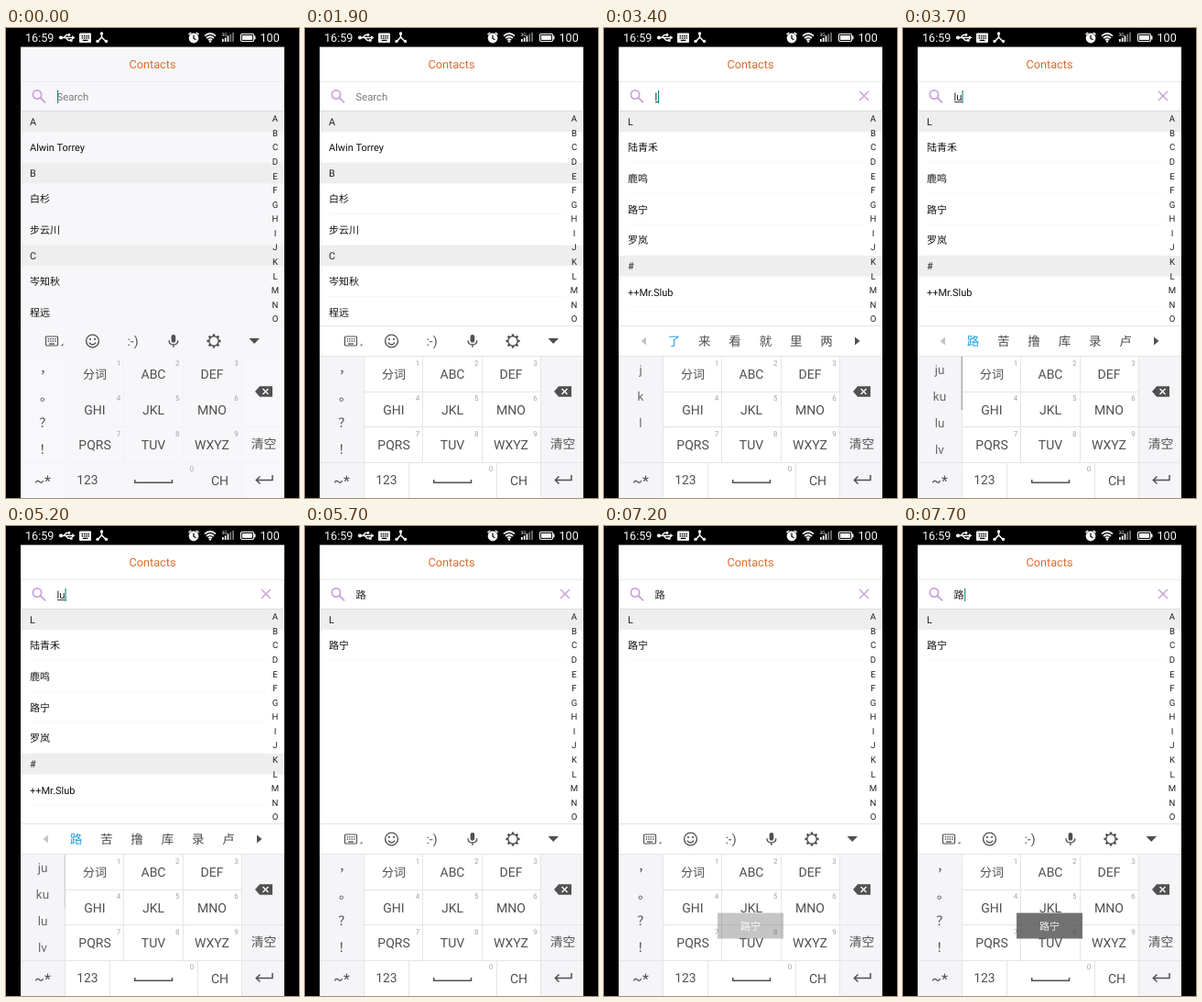
These frames come from a looping animation (320 by 512 pixels, 8000 ms). An HTML page:

```html
<!DOCTYPE html>
<html lang="zh-CN">
<head>
<meta charset="utf-8">
<title>Contacts</title>
<style>
html, body { margin: 0; width: 100%; height: 100%; overflow: hidden; background: #000; }
svg { display: block; width: 320px; height: 512px; --page: #fff; --line: #e5e5e8; --side: #f5f5f8;
  font-family: Roboto, "Noto Sans CJK SC", "Noto Sans CJK", sans-serif; }
svg.pale { --page: #f7f7fa; --line: #f3f3f6; --side: #f8f8fb; }
.page { fill: var(--page); }
.side { fill: var(--side); }
.key { stroke: var(--line); fill: none; }
text { white-space: pre; text-rendering: geometricPrecision; }
</style>
</head>
<body>
<svg id="stage" width="320" height="512" viewBox="0 0 320 512"></svg>
<script>
const stage = document.getElementById('stage');
const INK = '#202020', KEY = '#505052', LILAC = '#cba4dc', WHITE = '#f8f8f8';
const LOOP = 8000, TOP = 90.5, HEAD = 22.5, ROW = 33.75;

function add(tag, attrs, parent = stage) {
  const el = document.createElementNS('http://www.w3.org/2000/svg', tag);
  for (const k in attrs) el.setAttribute(k, attrs[k]);
  return parent.appendChild(el);
}
const group = () => add('g', {});
const box = (x, y, w, h, fill, parent) => add('rect', { x, y, width: w, height: h, fill }, parent);
const area = (x, y, w, h, cls, parent) => add('rect', { x, y, width: w, height: h, class: cls }, parent);
const line = (d, stroke, width, parent) =>
  add('path', { d, stroke, 'stroke-width': width, fill: 'none' }, parent);
const solid = (d, fill, parent) => add('path', { d, fill }, parent);
const dot = (cx, cy, r, fill, parent) => add('circle', { cx, cy, r, fill }, parent);
const ring = (cx, cy, r, stroke, width, parent) =>
  add('circle', { cx, cy, r, stroke, 'stroke-width': width, fill: 'none' }, parent);

// Text placed by the middle of its capitals
function label(x, cy, str, size, fill, parent, anchor = 'middle') {
  const el = add('text', { x, y: cy + size * 0.36, 'font-size': size, fill, 'text-anchor': anchor }, parent);
  el.textContent = str;
  return el;
}

function keyDots(x, y, w, h, fill, gap, parent) {
  for (let r = 0; r < 2; r++)
    for (let c = 0; c < 4; c++)
      box(x + w * (0.17 + c * 0.19), y + 2 + r * gap, 1.4, 1.4, fill, parent);
  box(x + w * 0.27, y + h - 2.6, w * 0.46, 1.3, fill, parent);
}

function statusBar() {
  label(21, 10.5, '16:59', 12.6, WHITE, stage, 'start');
  line('M60 10.5H73M63 10.5L66 7.5H69M65 10.5L68 13.5H71', WHITE, 1.3);
  dot(60, 10.5, 2.1, WHITE);
  dot(69, 7.5, 1.4, WHITE);
  box(70, 12.2, 2.6, 2.6, WHITE);
  solid('M72 8.2L75.5 10.5L72 12.8Z', WHITE);
  add('rect', { x: 80, y: 5.5, width: 13, height: 10.4, rx: 1, fill: WHITE });
  keyDots(80.6, 6, 12, 9.4, '#000', 2.3);
  line('M104.5 6V10L100 15M104.5 10L109.5 15', WHITE, 1.6);
  for (const [cx, cy] of [[104.5, 6], [100, 14.5], [109.5, 14.5]]) dot(cx, cy, 1.7, WHITE);
  dot(205, 11, 5.4, WHITE);
  line('M205 7.8V11.4L207.4 12.8', '#000', 1.2);
  line('M199.5 7.2L202.3 5M210.5 7.2L207.7 5', WHITE, 1.5);
  line('M217 8.6Q223 3.4 229 8.6M219 11Q223 7.4 227 11M221 13.2Q223 11.4 225 13.2', WHITE, 1.8);
  dot(223, 14.6, 1.2, WHITE);
  label(238.5, 6.8, '3G', 5, WHITE);
  [3, 4.5, 6.5, 8.5, 10].forEach((h, i) => box(236 + i * 2.8, 15 - h, 1.7, h, i < 3 ? WHITE : '#777'));
  add('rect', { x: 256.5, y: 6.5, width: 14, height: 8, rx: 1.2, fill: 'none', stroke: WHITE, 'stroke-width': 1.2 });
  box(258, 8, 11, 5, WHITE);
  box(271, 8.6, 1.5, 3.8, WHITE);
  label(277.5, 10.5, '100', 12.6, WHITE, stage, 'start');
}

function contactList(sections) {
  const g = group();
  let y = TOP;
  for (const [letter, ...names] of sections) {
    box(16, y, 288, HEAD, '#eeeeef', g);
    label(26, y + HEAD / 2 + 0.3, letter, 10.8, INK, g, 'start');
    y += HEAD;
    for (const name of names) {
      label(26, y + ROW / 2 + 0.2, name, 11, '#111', g, 'start');
      y += ROW;
      if (y < 324) box(26, y - 0.7, 258, 0.7, '#f4f4f5', g);
    }
  }
  return g;
}

function sideColumn(items) {
  const g = group();
  items.forEach((s, i) => label(40, 372 + i * 29.2, s, 13.5, '#6a6a6c', g));
  return g;
}

function candidates(words) {
  const g = group();
  solid('M46 336.5V345.5L40.5 341Z', '#c4c4c6', g);
  solid('M274 336.5V345.5L279.5 341Z', KEY, g);
  [...words].forEach((w, i) => label(76.5 + i * 33.3, 340.8, w, 13.5, i ? '#4c4c4e' : '#259fe3', g));
  return g;
}

function toolbar() {
  const g = group();
  add('rect', { x: 43.5, y: 336, width: 13, height: 10, rx: 1, fill: 'none', stroke: KEY, 'stroke-width': 1.2 }, g);
  keyDots(43.5, 336, 13, 10, KEY, 2.5, g);
  solid('M62.5 343.5V346.3H59.7Z', '#777', g);
  ring(94.5, 341, 6.9, KEY, 1.4, g);
  dot(92, 339, 1.1, KEY, g);
  dot(97, 339, 1.1, KEY, g);
  line('M90.8 342.6Q94.5 347.4 98.2 342.6', KEY, 1.3, g);
  label(138.5, 340.6, ':-)', 14, KEY, g);
  add('rect', { x: 180.6, y: 334, width: 4.6, height: 8.8, rx: 2.3, fill: KEY }, g);
  line('M178 340.2Q178 345 182.9 345T187.8 340.2M182.9 345V348', KEY, 1.3, g);
  ring(227, 341, 5.2, KEY, 1.4, g);
  for (let i = 0; i < 8; i++)
    add('path', { d: 'M227 333.4V336', stroke: KEY, 'stroke-width': 2.4, transform: `rotate(${i * 45} 227 341)` }, g);
  solid('M265.5 338H277L271.2 344Z', KEY, g);
  return g;
}

function keypad() {
  area(16, 324.3, 288, 187.7, 'page');
  area(16, 357, 48.5, 155, 'side');
  area(257, 357, 47, 155, 'side');
  add('path', { class: 'key', d: 'M16 324.5H304M16 357.5H304M64.5 396.5H257.5M64.5 434.5H304M16 473.5H304' +
    'M64.5 357V512M128.5 357V473M193.5 357V473M257.5 357V512M113.5 473V512M209.5 473V512' });
  ['分词', 'ABC', 'DEF', 'GHI', 'JKL', 'MNO', 'PQRS', 'TUV', 'WXYZ'].forEach((s, i) => {
    const c = i % 3, r = (i - c) / 3;
    label(97 + c * 64, 377 + r * 38.5, s, i ? 14 : 13, KEY);
    label(123 + c * 64.2, 365 + r * 38.5, i + 1, 8, '#a2a2a4');
  });
  label(203, 480.3, '0', 8, '#a2a2a4');
  label(89, 492.5, '123', 13.8, KEY);
  label(233.5, 492.5, 'CH', 14, KEY);
  label(40, 493, '~*', 16, KEY);
  label(281.5, 453.5, '清空', 13.8, KEY);
  line('M140.7 492V495.3H181.5V492', KEY, 1.5);
  solid('M272 396L277 390.3H291V401.7H277Z', KEY);
  line('M280.5 393L286.5 399M286.5 393L280.5 399', '#fff', 1.4);
  line('M291 487V492.5H274M277.5 488.5L273.3 492.5L277.5 496.5', KEY, 1.5);
}

function searchText(str, underline) {
  const g = group();
  label(55.5, 75, str, 11.2, INK, g, 'start');
  if (underline) box(56, 80.2, underline, 0.9, INK, g);
  return g;
}

// Build the scene, back to front
statusBar();
area(16, 20.6, 288, 491.4, 'page');
label(160, 39.6, 'Contacts', 12.7, '#dc6c2c');

const lists = [
  contactList([['A', 'Alwin Torrey'], ['B', '白杉', '步云川'], ['C', '岑知秋', '程远']]),
  contactList([['L', '陆青禾', '鹿鸣', '路宁', '罗岚'], ['#', '++Mr.Slub']]),
];
lists.push(group());
const clip = add('clipPath', { id: 'row' });
box(16, TOP + HEAD, 288, ROW, '#000', clip);
const ripple = add('circle', { cx: 185, cy: 130, r: 0, fill: '#f2f2f2', 'clip-path': 'url(#row)' }, lists[2]);
lists[2].append(contactList([['L', '路宁']]));

area(16, 58, 288, 32.5, 'page');
line('M16 58.5H304', '#ebebed', 1);
line('M16.5 59V90.5H303.5V59', '#dcdcde', 1);
ring(34, 72.5, 4.6, LILAC, 1.8);
line('M37.3 75.8L43 81.4', LILAC, 2);
const clear = line('M279 69L289 79M289 69L279 79', LILAC, 1.5);
const hint = label(55.5, 75, 'Search', 11.3, '#7c7c7e', stage, 'start');
const typed = [hint, searchText('l', 3), searchText('lu', 8.5), searchText('路', 0)];
const caret = box(56, 68, 1.1, 14, '#0c8478');

for (let i = 0; i < 15; i++)
  label(294, 98.8 + i * 15.57, String.fromCharCode(65 + i), 9.6, INK);

keypad();
const punct = group();
label(44, 370.5, '，', 14, KEY, punct);
label(44, 400.5, '。', 14, KEY, punct);
label(43.3, 430, '？', 14, KEY, punct);
label(43.3, 459, '！', 14, KEY, punct);
const sides = [punct, sideColumn(['j', 'k', 'l']), sideColumn(['ju', 'ku', 'lu', 'lv'])];
const bars = [toolbar(), candidates('了来看就里两'), candidates('路苦撸库录卢')];
const thumb = box(63.6, 358, 1.4, 58, '#a8a8aa');

const toast = group();
box(124, 421.5, 72, 28, 'rgba(75,75,75,.78)', toast);
label(160, 435.6, '路宁', 11, '#f4f4f4', toast);

// Times at which the caret flips, starting visible
const FLIPS = [100, 400, 900, 1400, 1900, 2400, 2900, 3000, 4300, 4800, 5700, 6400, 6900, 7400];
// Start times of: empty, one letter, two letters, chosen word
const STEPS = [0, 3100, 3600, 5300];
const CARET_X = [56, 59, 64.5, 67.2];

const ramp = (t, a, b) => Math.min(1, Math.max(0, (t - a) / (b - a)));
const show = (el, on) => { el.style.display = on ? '' : 'none'; };
const pick = (set, n) => set.forEach((el, i) => show(el, i === n));

function draw(t) {
  const step = STEPS.filter(s => s <= t).length - 1;
  stage.classList.toggle('pale', t < 100);
  pick(typed, step);
  pick(lists, [0, 1, 1, 2][step]);
  pick(sides, step % 3);
  pick(bars, step % 3);
  show(clear, step > 0);
  show(caret, FLIPS.filter(f => f <= t).length % 2 === 0);
  caret.setAttribute('x', CARET_X[step]);

  show(thumb, step === 2);
  thumb.setAttribute('opacity', 1 - 0.65 * ramp(t, 4000, 4350));

  show(ripple, t >= 6500 && t < 7200);
  ripple.setAttribute('r', 20 + 37 * ramp(t, 6500, 6800) + 130 * ramp(t, 6850, 7100));
  ripple.setAttribute('opacity', 1 - ramp(t, 6900, 7200));
  toast.setAttribute('opacity', ramp(t, 7000, 7500));
}

function tick() {
  draw(performance.now() % LOOP);
  requestAnimationFrame(tick);
}
tick();
</script>
</body>
</html>
```
